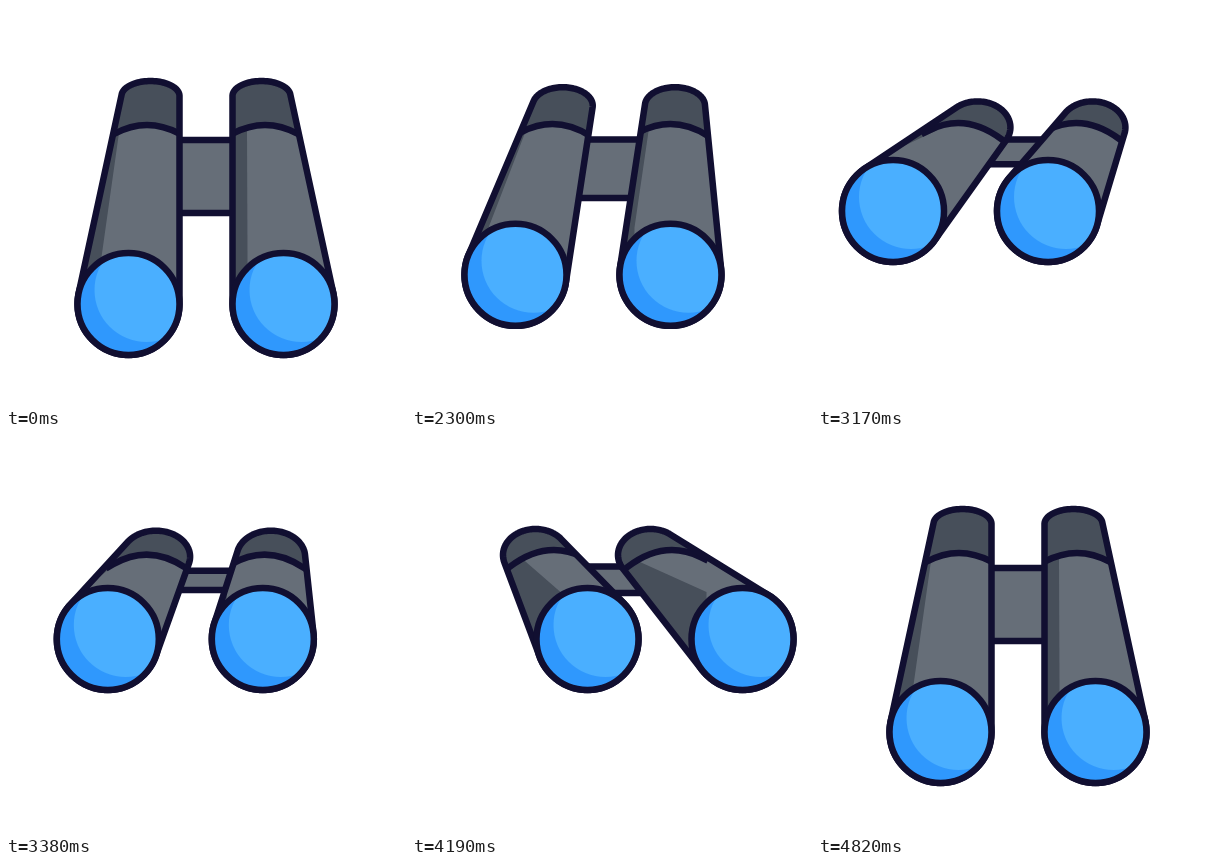
Write an HTML page that moves like this. It is 400x400 px and loops after 4.85 s.

```html
<!DOCTYPE html>
<html lang="en">
<head>
<meta charset="utf-8">
<title>Binoculars</title>
<style>
  html, body { margin: 0; width: 100%; height: 100%; overflow: hidden; background: #fff; }
  svg { display: block; width: 100%; height: 100%; }
  .line { stroke: #110f31; stroke-width: 6.5; stroke-linejoin: round; }
  .line:not(.body) { fill: none; }
  .body { fill: #666e78; }
  .dark { fill: #474f5a; }
  .glass { fill: #2f98fd; }
  .shine { fill: #4aafff; }
</style>
</head>
<body>
<svg viewBox="0 0 400 400">
  <defs>
    <clipPath id="hull0"><path/></clipPath>
    <clipPath id="hull1"><path/></clipPath>
    <clipPath id="disc"><circle r="51"/></clipPath>
    <g id="lens">
      <circle class="glass" r="51"/>
      <circle class="shine" cx="18" cy="-14" r="52" clip-path="url(#shineArea)"/>
      <circle class="line" r="51"/>
    </g>
    <clipPath id="shineArea"><circle r="51"/></clipPath>
  </defs>
  <rect id="bridge" class="line body" x="150" width="100"/>
  <g id="tube0"></g>
  <g id="tube1"></g>
</svg>
<script>
const LOOP = 4850, START = 2030, STEP = 30, R = 51;

// u: look left (-1) to right (1); v: lift, 0 at rest
const MOVES = [
  { at: 2000, dur: 130, u: 0, v: -0.07 },
  { at: 2130, dur: 420, u: -1, v: 1 },
  { at: 3043, dur: 919, u: 1, v: 1 },
  { at: 4220, dur: 420, u: 0, v: -0.07 },
  { at: 4640, dur: 180, u: 0, v: 0 }
];

const $ = s => document.querySelector(s);
const path = pts => 'M' + pts.map(p => p.map(n => n.toFixed(2))).join('L') + 'Z';

function pose(t) {
  let u = 0, v = 0;
  if (t < START) return [u, v];
  t = START + STEP * Math.floor((t - START) / STEP);
  for (const m of MOVES) {
    const s = Math.min(1, Math.max(0, (t - m.at) / m.dur));
    const e = s * s * (3 - 2 * s);
    u += (m.u - u) * e;
    v += (m.v - v) * e;
  }
  return [u, v];
}

// Convex hull of the cap ellipse and the lens circle, by support points
function hull(cx, cy, rx, ry, lx, ly) {
  const pts = [];
  for (let d = 0; d < 360; d += 2) {
    const c = Math.cos(d * Math.PI / 180), s = Math.sin(d * Math.PI / 180);
    const h = Math.hypot(rx * c, ry * s);
    const onCap = cx * c + cy * s + h > lx * c + ly * s + R;
    pts.push(onCap ? [cx + rx * rx * c / h, cy + ry * ry * s / h] : [lx + R * c, ly + R * s]);
  }
  return pts;
}

const tubes = [0, 1].map(i => {
  const g = $('#tube' + i);
  g.innerHTML = `<g clip-path="url(#hull${i})"><path class="body"/><path class="dark"/>
    <path class="dark"/><path class="line"/></g><path class="line"/><use href="#lens"/>`;
  const [body, shade, cap, seam, edge] = g.querySelectorAll('path');
  return { body, shade, cap, seam, edge, lens: g.querySelector('use'), clip: $(`#hull${i} path`) };
});

// Both tubes share the left tube's geometry; the right one is mirrored
function drawTube(i, u, v) {
  const el = tubes[i], side = i ? -u : u, mid = v * v - u * u;
  const flip = ([x, y]) => [i ? 400 - x : x, y];
  const lens = [122.5 + 53 * side, 298 - 93 * v];

  const cap = [144.5 - 2 * v - 19 * side, 90 + 31 * v + 2 * mid, 29 + 3.5 * v + 2 * mid, 15 + 11 * v];
  const outline = path(hull(...cap, ...lens).map(flip));
  for (const p of [el.body, el.edge, el.clip]) p.setAttribute('d', outline);

  const x = 141 - 7 * side, y = 128 + 5 * mid, w = 33 + 3.5 * v, tilt = 5 * side;
  const p = flip([x - w, y + tilt]), q = flip([x + w, y - tilt]);
  const c = flip([x, y - 18 - 5 * v]);
  const beyond = a => a.map((n, k) => n + (n - c[k]) * 0.2);
  const p2 = beyond(p), q2 = beyond(q), out = i ? -30 : 30;
  const arc = `M${p2}L${p}Q${c} ${q}L${q2}`;
  el.seam.setAttribute('d', arc);
  el.cap.setAttribute('d', `${arc}L${q2[0] + out} 40L${p2[0] - out} 40Z`);

  // Light always comes from the right, so the shade is not mirrored
  const [lx, ly] = flip(lens);
  const sx = i ? 241 - 15 * v : 113, bx = lx - (i ? 36 : 27), by = ly - 47;
  const tx = sx - (bx - sx) * 0.1, ty = 127 - (by - 127) * 0.1;
  el.shade.setAttribute('d', path([
    [tx, ty], [bx, by], [bx, by + 100], [sx - 90, by + 100], [sx - 90, ty]
  ]));

  el.lens.setAttribute('transform', `translate(${lx} ${ly})`);
}

function draw(t) {
  const [u, v] = pose(t), mid = v * v - u * u;
  const top = 134 - 1.5 * v + 5 * mid, bottom = 207 - 48 * v - 3.5 * mid;
  $('#bridge').setAttribute('y', top);
  $('#bridge').setAttribute('height', bottom - top);
  drawTube(0, u, v);
  drawTube(1, u, v);
}

const begin = performance.now();
function tick() {
  draw((performance.now() - begin) % LOOP);
  requestAnimationFrame(tick);
}
tick();
</script>
</body>
</html>
```
